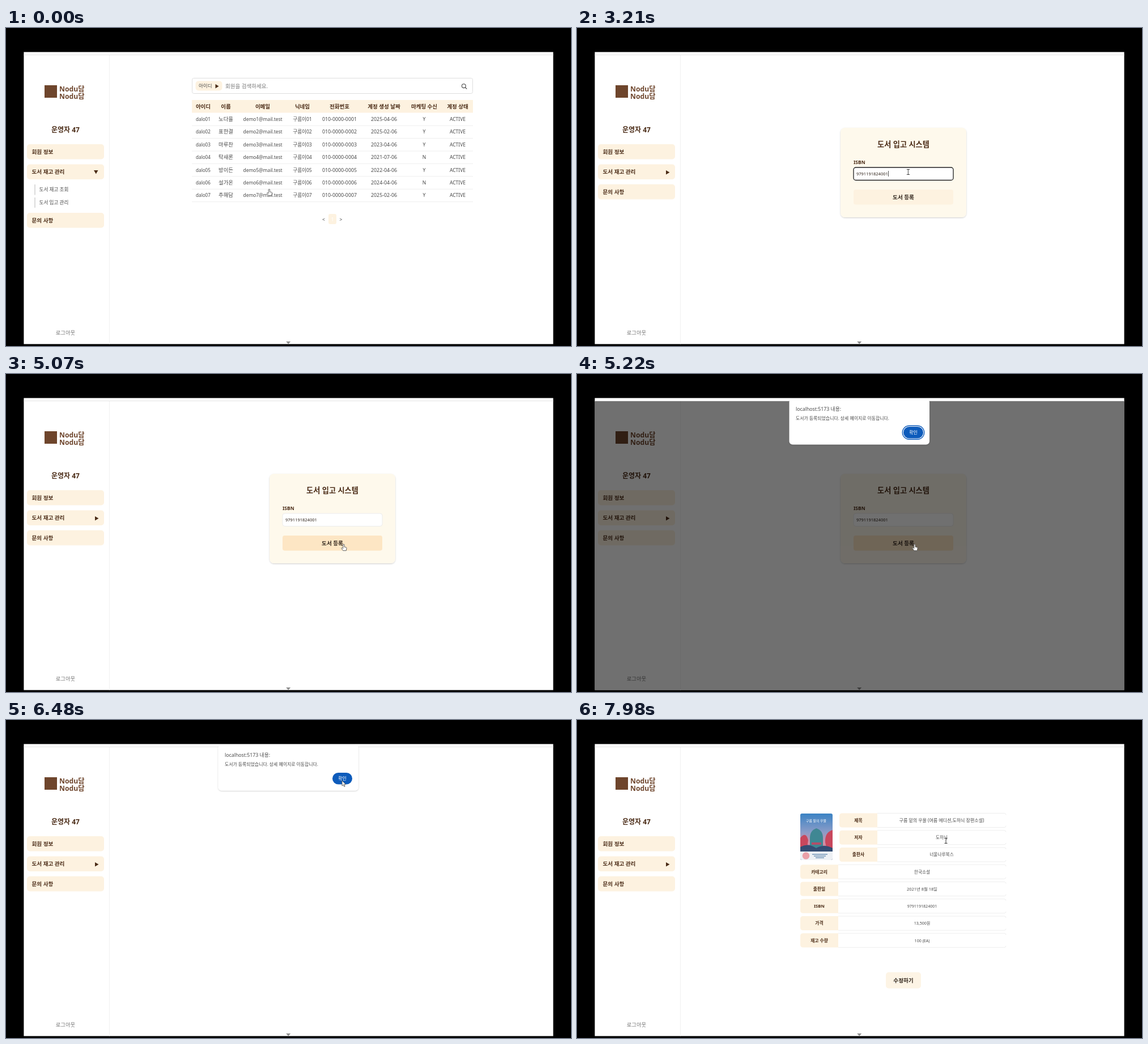
Write an HTML page that moves like this. It is 997 by 561 pixels and loops after 8000 ms.

```html
<!DOCTYPE html>
<html lang="ko">
<head>
<meta charset="utf-8">
<title>도서 입고</title>
<style>
html, body { margin: 0; width: 100%; height: 100%; overflow: hidden; background: #000; }
svg { display: block; width: 997px; height: 561px; }
text { font-family: 'Noto Sans', 'Noto Sans CJK KR', sans-serif; fill: #4a4a4a; white-space: pre; }
.b { font-weight: 700; fill: #4b2c17; }
.m { text-anchor: middle; }
.cream { fill: #fdf2e0; }
.brown { fill: #4b2c17; }
.logo { fill: #6e452c; }
.dark { fill: #2d2118; }
.gray { fill: #777; }
.pale { fill: #999; }
.white { fill: #fff; }
.line { stroke: #eee; fill: none; }

/* hard switches */
.sw { animation: 8s step-end infinite; }
.off { opacity: 0; }
#list, #sub { animation-name: list; }
#closed { animation-name: closed; }
#inquiry { animation-name: inquiry; }
#form { animation-name: form; }
#focus { animation-name: focus; }
#empty { animation-name: empty; }
#caret1 { animation-name: caret1; }
#value { animation-name: value; }
#caret2 { animation-name: caret2; }
#hover { animation-name: hover; }
#dim { animation-name: dim; }
#alert { animation-name: alert; }
#ring { animation-name: ring; }
#detail { animation-name: detail; }
#hand { animation-name: hand; }
#arrow { animation-name: arrow; }
#beam { animation-name: beam; }
@keyframes list { 15%, to { opacity: 0 } }
@keyframes closed { 15%, to { opacity: 1 } }
@keyframes inquiry { 15%, to { transform: translateY(-50.3px) } }
@keyframes form { 15% { opacity: 1 } 80.4%, to { opacity: 0 } }
@keyframes focus { 27.5% { opacity: 1 } 48%, to { opacity: 0 } }
@keyframes empty { 34%, to { opacity: 0 } }
@keyframes caret1 { 27.5%, to { opacity: 1 } }
@keyframes value { 34%, to { opacity: 1 } }
@keyframes caret2 { 34% { opacity: 1 } 40.6% { opacity: 0 } 47.2% { opacity: 1 } 48%, to { opacity: 0 } }
@keyframes hover { 44.25%, to { opacity: 1 } }
@keyframes dim { 64% { opacity: 1 } 80.4%, to { opacity: 0 } }
@keyframes alert { 64% { opacity: 1 } 82%, to { opacity: 0 } }
@keyframes ring { 78.75%, to { opacity: 0 } }
@keyframes detail { 83%, to { opacity: 1 } }
@keyframes hand {
  0% { opacity: 1 } 6% { opacity: 0 } 11.8% { opacity: 1 } 15% { opacity: 0 }
  44.25% { opacity: 1 } 72%, to { opacity: 0 }
}
@keyframes arrow {
  6% { opacity: 1 } 11.8% { opacity: 0 } 15% { opacity: 1 } 25% { opacity: 0 }
  43% { opacity: 1 } 44.25% { opacity: 0 } 72% { opacity: 1 } 98%, to { opacity: 0 }
}
@keyframes beam {
  25% { opacity: 1 } 43% { opacity: 0 } 98%, to { opacity: 1 }
}

#cursor { animation: move 8s ease-in-out infinite; }
@keyframes move {
  0%, 6% { transform: translate(464.5px, 284px) }
  7.4%, 9.4% { transform: translate(290px, 296px) }
  12.5%, 15.4% { transform: translate(102px, 306px) }
  18%, 19.5% { transform: translate(126px, 306px) }
  26.3%, 41.25% { transform: translate(584.5px, 254px) }
  45.5%, 71% { transform: translate(596px, 300px) }
  77.5%, 90.4% { transform: translate(593px, 107px) }
  99%, to { transform: translate(651px, 213px) }
}
</style>
</head>
<body>
<svg viewBox="0 0 997 561">
  <defs>
    <linearGradient id="sky" x2="0" y2="1">
      <stop offset="0" stop-color="#3b83c4"/>
      <stop offset=".4" stop-color="#8a9cc8"/>
      <stop offset=".65" stop-color="#d58fa5"/>
      <stop offset="1" stop-color="#2b4a70"/>
    </linearGradient>
    <filter id="soft" x="-10%" y="-10%" width="120%" height="120%">
      <feDropShadow dx="0" dy="1" stdDeviation="1.2" flood-opacity=".2"/>
    </filter>
  </defs>
  <rect width="997" height="561"/>
  <rect class="white" x="31.4" y="42.4" width="934.2" height="515.2"/>
  <path d="M31.4 47.5H965.6" stroke="#e6e6e6"/>
  <path d="M182.5 48V557.6" stroke="#f1f1f1"/>
  <path d="M494.2 553h8l-4 4.6z" fill="#8c8c8c"/>

  <!-- sidebar -->
  <rect class="logo" x="68" y="101" width="22" height="22"/>
  <g font-size="12.2">
    <text class="b logo" x="94" y="112.3">Nodu담</text>
    <text class="b logo" x="94" y="124.5">Nodu담</text>
  </g>
  <text class="b m" x="105" y="184" font-size="12">운영자 47</text>
  <g font-size="9.6">
    <rect class="cream" x="37" y="205" width="136" height="26.5" rx="5"/>
    <text class="b" x="45.5" y="222">회원 정보</text>
    <rect class="cream" x="37" y="240.5" width="136" height="26.5" rx="5"/>
    <text class="b" x="45.5" y="257.3">도서 재고 관리</text>
    <g id="inquiry" class="sw">
      <rect class="cream" x="37" y="326" width="136" height="26.5" rx="5"/>
      <text class="b" x="45.5" y="342.8">문의 사항</text>
    </g>
  </g>
  <g id="sub" class="sw" font-size="8.6">
    <path class="brown" d="M155 251h7.5l-3.75 6.5z"/>
    <path d="M51 276v18.5M51 299v18" stroke="#cfcfcf" stroke-width="1.5"/>
    <text x="58.5" y="288.3">도서 재고 조회</text>
    <text x="58.5" y="311">도서 입고 관리</text>
  </g>
  <path id="closed" class="brown sw off" d="M157 251v7.5l6.5-3.75z"/>
  <text class="m gray" x="105" y="541" font-size="9.4">로그아웃</text>

  <!-- member list -->
  <g id="list" class="sw">
    <rect x="328.5" y="88.5" width="495" height="27" rx="3" fill="#fff" stroke="#dedede"/>
    <rect class="cream" x="334.5" y="93.5" width="47" height="17" rx="5"/>
    <text x="340" y="105" font-size="8.5">아이디</text>
    <path class="brown" d="M369.5 99v7.5l6-3.75z"/>
    <text class="gray" x="387" y="105.5" font-size="9.5">회원을 검색하세요.</text>
    <path d="M810.2 104.7l3 3" stroke="#444" stroke-width="1.2"/>
    <circle cx="807.8" cy="102.2" r="3.4" fill="none" stroke="#444" stroke-width="1.1"/>
    <rect class="cream" x="328" y="127" width="496" height="22.5"/>
    <g id="rows"></g>
    <rect class="cream" x="569" y="328" width="14" height="18" rx="3"/>
    <g class="m" font-size="8.5">
      <text x="560.5" y="340.7">&lt;</text>
      <text class="white" x="576" y="340.5">1</text>
      <text x="591" y="340.7">&gt;</text>
    </g>
  </g>

  <!-- stock form -->
  <g id="form" class="sw off">
    <rect x="465" y="176" width="222" height="158" rx="8" fill="#fef9ec" filter="url(#soft)"/>
    <text class="b m" x="576" y="210" font-size="13.2">도서 입고 시스템</text>
    <text class="b" x="488" y="239.5" font-size="8.5">ISBN</text>
    <rect x="488" y="246" width="176" height="22.5" rx="4" fill="#fff" stroke="#ececec"/>
    <rect id="focus" class="sw off" x="488" y="246" width="176" height="22.5" rx="4" fill="none" stroke="#222" stroke-width="1.3"/>
    <g id="empty" class="sw">
      <text class="pale" x="493" y="260.5" font-size="8.3">ISBN 번호를 입력해주세요.</text>
      <path id="caret1" class="sw off" d="M493.5 252v10" stroke="#222" stroke-width=".8"/>
    </g>
    <g id="value" class="sw off">
      <text class="dark" x="493" y="260.3" font-size="7.5">9791191824001</text>
      <path id="caret2" class="sw off" d="M549.5 252v10" stroke="#222" stroke-width=".8"/>
    </g>
    <rect class="cream" x="488" y="285" width="176" height="26.5" rx="4"/>
    <rect id="hover" class="sw off" x="488" y="285" width="176" height="26.5" rx="4" fill="#fde6c4"/>
    <text class="b m dark" x="576" y="302" font-size="9.6">도서 등록</text>
  </g>

  <!-- book detail -->
  <g id="detail" class="sw off">
    <rect x="394" y="165" width="57" height="82" rx="3" fill="url(#sky)"/>
    <text class="m white" x="422" y="180" font-size="6">구름 밑의 우물</text>
    <path d="M394 208q10-12 14 4l-3 20h-11zM451 194q-14 4-13 22l4 16h9z" fill="#c8475d"/>
    <path d="M411 229v-21q0-13 11.5-17 11.5 4 11.5 17v21z" fill="#3f8793"/>
    <path d="M394 224q14-8 28 2 14-8 29 0v7h-57z" fill="#334d73"/>
    <path d="M414 218h17" stroke="#b34d68" stroke-width="4"/>
    <path d="M394 232h57v12q0 3-3 3h-51q-3 0-3-3z" fill="#edf0f4"/>
    <circle cx="404" cy="239.5" r="6.3" fill="#eaa0a8"/>
    <path d="M415 237h27M418 240h21M421 243h15" stroke="#6f93b5" stroke-width="1.5"/>
    <g id="fields"></g>
    <rect x="545" y="445" width="62" height="28.5" rx="5" fill="#fdf4e5"/>
    <text class="b m dark" x="576" y="463" font-size="9.6">수정하기</text>
  </g>

  <!-- dialog -->
  <rect id="dim" class="sw off" x="31.4" y="48" width="934.2" height="509.6" fill="#000" fill-opacity=".56"/>
  <g id="alert" class="sw off">
    <rect class="white" x="374.5" y="43.5" width="247.5" height="81" rx="6" filter="url(#soft)"/>
    <text x="386" y="65" font-size="8.75">localhost:5173 내용:</text>
    <text x="386" y="80.5" font-size="7.9">도서가 등록되었습니다. 상세 페이지로 이동합니다.</text>
    <rect id="ring" class="sw" x="574.3" y="91.3" width="38.4" height="23.9" rx="12" fill="none" stroke="#0d5bbb" stroke-width="1.4"/>
    <rect x="576" y="93" width="35" height="20.5" rx="10.25" fill="#0d5bbb"/>
    <text class="m white" x="593.5" y="106" font-size="8">확인</text>
  </g>

  <g id="cursor" fill="#fff" stroke="#555" stroke-width=".9" stroke-linejoin="round">
    <path id="hand" class="sw off" d="M-1.2 1q1.2-1.8 2.2 0v4l3.2.8q1 .4.8 1.6l-.7 4.2h-5.5l-2.8-4q0-1.6 1.6-.8l1.2 1z"/>
    <path id="arrow" class="sw off" d="M0 0v9.2l2.2-2 1.5 3.4 1.5-.7-1.5-3.2h2.8z"/>
    <path id="beam" class="sw off" d="M-2.5-4.5h5M0-4.5v9M-2.5 4.5h5" stroke="#333" stroke-width="1"/>
  </g>
</svg>
<script>
const byId = id => document.getElementById(id);
const label = (x, y, size, str, cls = 'm') =>
  `<text class="${cls}" x="${x}" y="${y}" font-size="${size}">${str}</text>`;

const columns = [
  ['아이디', 348, 8.1], ['이름', 388, 9.4], ['이메일', 453, 8.4], ['닉네임', 523, 8.6],
  ['전화번호', 588.5, 8.8], ['계정 생성 날짜', 667, 8.8], ['마케팅 수신', 738, 8.5], ['계정 상태', 797, 8.5]
];
const members = [
  ['노다율', '2025-04-06', 'Y'], ['표한결', '2025-02-06', 'Y'], ['마루찬', '2023-04-06', 'Y'],
  ['탁새론', '2021-07-06', 'N'], ['방이든', '2022-04-06', 'Y'], ['설가온', '2024-04-06', 'N'],
  ['추해담', '2025-02-06', 'Y']
];
const head = columns.map(([name, x]) => label(x, 142, 9.5, name, 'b m'));
const rows = members.map(([name, date, consent], i) => {
  const n = i + 1, y = 164 + i * 22.4;
  const cells = [`dalo0${n}`, name, `demo${n}@mail.test`, `구름이0${n}`,
    `010-0000-000${n}`, date, consent, 'ACTIVE'];
  return cells.map((cell, c) => label(columns[c][1], y, columns[c][2], cell)).join('') +
    `<path class="line" d="M328 ${y + 8.2}H824"/>`;
});
byId('rows').innerHTML = [...head, ...rows].join('');

const fields = [
  ['제목', '구름 밑의 우물 (여름 에디션,도하늬 장편소설)', 8], ['저자', '도하늬', 7.7],
  ['출판사', '너울나루북스', 7.7], ['카테고리', '한국소설', 7.7], ['출판일', '2021년 8월 18일', 7.4],
  ['ISBN', '9791191824001', 7.1], ['가격', '13,500원', 7.1], ['재고 수량', '100 (EA)', 7.1]
];
byId('fields').innerHTML = fields.map(([name, value, size], i) => {
  const x = i < 3 ? 463 : 394, y = 164.5 + i * 30.25;
  return `<path class="line" d="M${x + 67} ${y}H754q3 0 3 3M757 ${y + 22}q0 3-3 3H${x + 67}"/>
    <path class="cream" d="M${x + 67} ${y}h-62q-5 0-5 5v15q0 5 5 5h62z"/>` +
    label(x + 33.5, y + 15.4, 7.8, name, 'b m') +
    label((x + 67 + 757) / 2, y + 15.4, size, value);
}).join('');
</script>
</body>
</html>
```
